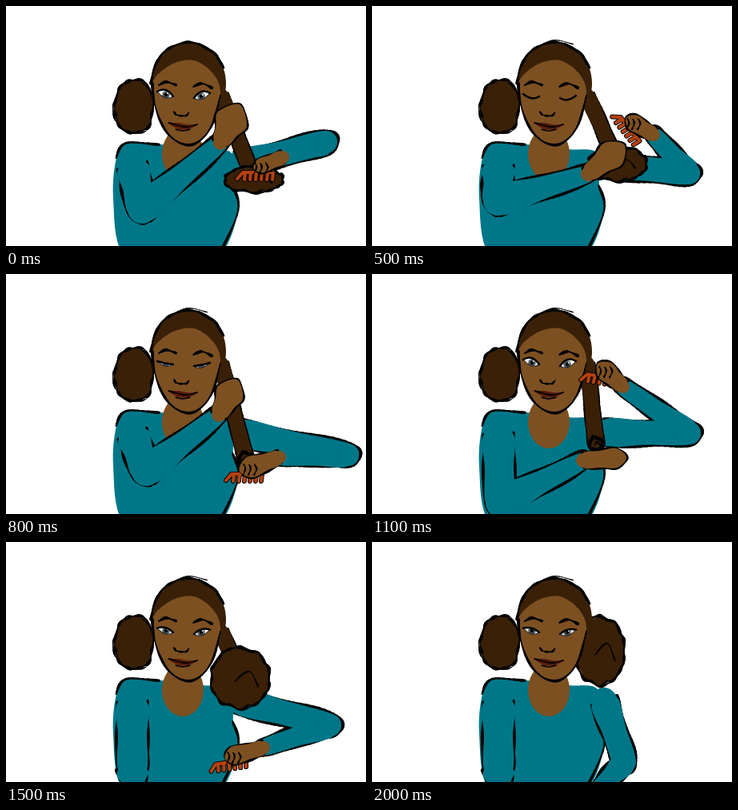
Write an HTML page with a canvas that moves like this. It is 450 px wide and 300 px high and loops after 2200 ms.

```html
<!DOCTYPE html>
<html lang="en">
<head>
<meta charset="utf-8">
<title>Combing hair</title>
<style>
html, body { margin: 0; width: 100%; height: 100%; overflow: hidden; background: #fff; }
canvas { display: block; }
</style>
</head>
<body>
<canvas id="stage" width="450" height="300"></canvas>
<script>
const ctx = document.getElementById('stage').getContext('2d');
const TEAL = '#007788', SKIN = '#7d5022', HAIR = '#3a2007', INK = '#050505', COMB = '#b5410f';
const LOOP = 2200, STEP = 100, LAST = 20;
const FAR_SHOULDER = [290, 198], NEAR_SHOULDER = [158, 200], HAIR_ROOT = [269, 112];

// far, near: elbow, wrist, knuckles, fist radius. puff: centre and radii. look: eyelid, comb tilt.
const poses = [
  { at: 0, far: [400,170, 346,189, 318,200, 9], near: [170,254, 268,171, 283,141, 20], puff: [310,217,37,16], look: [0, 0] },
  { at: 3, far: [343,282, 300,318, 280,330, 10], near: [163,250, 263,178, 283,142, 20], puff: [306,183,35,33], look: [0.7, 0] },
  { at: 5, far: [396,209, 352,161, 326,145, 10], near: [157,244, 270,210, 302,184, 17], puff: [307,197,37,22], look: [1, 0.9] },
  { at: 8, far: [427,226, 342,229, 304,242, 13], near: [175,247, 266,176, 281,147, 17], puff: [300,232,9,9], look: [0.65, 0] },
  { at: 11, far: [397,199, 314,141, 291,120, 12], near: [160,286, 264,233, 306,230, 12], puff: [280,212,8,8], look: [0, 0.15] },
  { at: 15, far: [405,229, 322,257, 284,267, 11], near: [158,285, 160,320, 160,340, 12], puff: [293,170,37,38], look: [0.2, -0.15] },
  { at: 20, far: [316,275, 281,312, 270,335, 10], near: [158,285, 160,320, 160,340, 12], puff: [285,136,31,43], look: [0.25, 0] }
];

const torso = [138,190, 150,171, 192,173, 245,179, 282,184, 284,225, 290,255, 268,310, 205,340, 146,310, 134,240];
const face = [205,74, 235,68, 260,86, 268,112, 256,152, 231,174, 203,160, 187,128, 183,96];

const mix = (a, b, k) => a + (b - a) * k;
const mixAll = (a, b, k) => a.map((v, i) => mix(v, b[i], k));

function random(seed) {
  let s = seed * 7919 + 17;
  return () => (s = (s * 16807) % 2147483647) / 2147483647 * 2 - 1;
}

// Catmull-Rom samples through a flat list of coordinates.
function curve(flat, closed) {
  const n = flat.length / 2, out = [];
  const at = i => {
    const j = closed ? (i + n) % n : Math.max(0, Math.min(n - 1, i));
    return [flat[j * 2], flat[j * 2 + 1]];
  };
  for (let i = 0; i < (closed ? n : n - 1); i++) {
    const [a, b, c, d] = [at(i - 1), at(i), at(i + 1), at(i + 2)];
    for (let s = 0; s < 8; s++) {
      const u = s / 8;
      out.push([0, 1].map(k => b[k] + 0.5 * u * (c[k] - a[k] +
        u * (2 * a[k] - 5 * b[k] + 4 * c[k] - d[k] + u * (3 * (b[k] - c[k]) + d[k] - a[k])))));
    }
  }
  out.push(at(closed ? 0 : n - 1));
  return out;
}

function fill(flat, color) {
  ctx.beginPath();
  curve(flat, true).forEach(p => ctx.lineTo(p[0], p[1]));
  ctx.fillStyle = color;
  ctx.fill();
}

function dot(x, y, r, color) {
  ctx.beginPath();
  ctx.arc(x, y, r, 0, 7);
  ctx.fillStyle = color;
  ctx.fill();
}

// Rough pen line: two wobbling passes of changing weight.
function ink(flat, width, seed, wobble = 1, closed = false) {
  const rnd = random(seed);
  ctx.strokeStyle = INK;
  for (const pass of [1, 0.6]) {
    const pts = curve(flat.map(v => v + rnd() * wobble), closed);
    const phase = rnd() * 6;
    for (let i = 1; i < pts.length; i++) {
      ctx.lineWidth = width * pass * (0.9 + 0.4 * Math.sin(i * 0.6 + phase));
      ctx.beginPath();
      ctx.moveTo(...pts[i - 1]);
      ctx.lineTo(...pts[i]);
      ctx.stroke();
    }
  }
}

function oval(x, y, rx, ry, bump = 0, points = 16) {
  const flat = [];
  for (let i = 0; i < points; i++) {
    const t = i / points * 2 * Math.PI, r = 1 + (i % 2 ? bump : -bump);
    flat.push(x + rx * r * Math.cos(t), y + ry * r * Math.sin(t));
  }
  return flat;
}

// Outline of a tapered limb, open at its start.
function limb([ax, ay], [bx, by], ra, rb) {
  const len = Math.hypot(bx - ax, by - ay) || 1;
  const dx = (bx - ax) / len, dy = (by - ay) / len;
  const side = (u, s) => {
    const r = mix(ra, rb, u) * s;
    return [mix(ax, bx, u) - dy * r, mix(ay, by, u) + dx * r];
  };
  return [...side(0, 1), ...side(0.5, 1), ...side(1, 1), bx + dx * rb, by + dy * rb,
    ...side(1, -1), ...side(0.5, -1), ...side(0, -1)];
}

// A chain of joints with radii: all outlines first, then one flat fill.
function chain(joints, radii, color, width, seed) {
  const parts = joints.slice(1).map((b, i) => limb(joints[i], b, radii[i], radii[i + 1]));
  parts.forEach((part, i) => ink(part, width, seed + i));
  parts.forEach((part, i) => {
    fill(part, color);
    dot(...joints[i], radii[i], color);
  });
}

function eye(x, y, side, lid) {
  const out = [x + side * 11, y - 3 + 3 * lid], inner = [x - side * 9, y + 3];
  const top = y - 10 + 19 * lid;
  ctx.save();
  ctx.beginPath();
  ctx.moveTo(...out);
  ctx.quadraticCurveTo(x, top, ...inner);
  ctx.quadraticCurveTo(x, y + 10, ...out);
  ctx.fillStyle = '#f4f4f4';
  ctx.fill();
  ctx.clip();
  dot(x, y + 1, 4.8, '#59656a');
  dot(x, y + 1, 2.4, '#0b0b0b');
  dot(x + 2, y - 1, 1, '#fff');
  ctx.restore();
  ctx.strokeStyle = INK;
  for (const [depth, weight] of [[top, 2.5], [y + 10, 1]]) {
    ctx.lineWidth = weight;
    ctx.beginPath();
    ctx.moveTo(...out);
    ctx.quadraticCurveTo(x, depth, ...inner);
    ctx.stroke();
  }
}

function head(lid, loose) {
  const bun = oval(160, 126, 25, 34), skull = oval(228, 97, 47, 52);
  fill(bun, HAIR);
  ink(bun, 2.8, 5, 1.8, true);
  fill(skull, HAIR);
  ink(skull.slice(16), 2.8, 8, 1.2);
  fill(face, SKIN);
  ink(face.slice(6), 2.4, 9);
  if (loose) ink([204,52, 228,43, 251,48], 1.2, 10, 0.4);
  eye(200, 110, -1, lid);
  eye(244, 112, 1, lid);
  ink([191,99, 200,95, 212,99], 3, 11, 0.3);
  ink([234,101, 245,97, 257,102], 3, 12, 0.3);
  ink([210,132, 213,136, 219,137, 225,137, 229,133], 2, 13, 0.3);
  fill([204,147, 214,146, 226,148, 238,149, 228,154, 216,154], '#571b0b');
  ink([203,146, 214,149, 226,151, 239,148], 1.5, 14, 0.3);
  ink([212,154, 221,156, 230,154], 1.2, 15, 0.2);
}

function hair([x, y, rx, ry]) {
  chain([HAIR_ROOT, [x, y]], [9, 9], HAIR, 4, 6);
  const puff = oval(x, y, rx, ry, 0.03, 20);
  fill(puff, HAIR);
  ink(puff, 2.8, 7, 1.6, true);
  ink([x - rx * 0.2, y + ry * 0.1, x + rx * 0.3, y - ry * 0.2, x + rx * 0.6, y + ry * 0.3], 1.5, 24);
}

// Drawn around the knuckles with teeth hanging down.
function comb(x, y, tilt) {
  ctx.save();
  ctx.translate(x - 4, y + 8);
  ctx.rotate(tilt);
  for (const [edge, color] of [[2, INK], [0, COMB]]) {
    ctx.strokeStyle = color;
    ctx.lineWidth = 4 + edge;
    ctx.beginPath();
    ctx.moveTo(-25, 8);
    ctx.lineTo(-18, 0);
    ctx.lineTo(20, 0);
    for (let i = 0; i < 6; i++) {
      ctx.moveTo(i * 7 - 15, 0);
      ctx.lineTo(i * 7 - 16, 9);
    }
    ctx.stroke();
  }
  ctx.restore();
}

function farHand([, , wx, wy, x, y, r], tilt) {
  comb(x, y, tilt);
  chain([[wx, wy], [x, y]], [8, r], SKIN, 3.6, 20);
  for (let i = -1; i < 2; i++) ink([x + i * 7, y - 4, x + i * 7 + 2, y + 2, x + i * 7 - 1, y + 9], 1.8, 32 + i, 0.5);
}

function arm(shoulder, [ex, ey, wx, wy], radii, seed) {
  chain([shoulder, [ex, ey], [wx, wy]], radii, TEAL, 5, seed);
}

function poseAt(step) {
  const i = Math.max(0, poses.findLastIndex(p => p.at <= step));
  const a = poses[i], b = poses[i + 1] || a;
  const u = a === b ? 0 : (step - a.at) / (b.at - a.at);
  const k = u * u * (3 - 2 * u), pose = {};
  for (const key of ['far', 'near', 'puff', 'look']) pose[key] = mixAll(a[key], b[key], k);
  return pose;
}

function draw(step) {
  const { far, near, puff, look: [lid, tilt] } = poseAt(step);
  ctx.fillStyle = '#fff';
  ctx.fillRect(0, 0, 450, 300);
  ctx.lineCap = ctx.lineJoin = 'round';

  fill(torso, TEAL);
  ink(torso.slice(0, 6), 2.8, 2);
  ink(torso.slice(10, 16), 2.8, 3);
  arm(FAR_SHOULDER, far, [16, 14, 10], 4);
  fill(oval(221, 185, 26, 33), SKIN);
  hair(puff);
  head(lid, step > 0);
  arm(NEAR_SHOULDER, near, [18, 18, 10], 16);
  farHand(far, tilt);
  chain([near.slice(2, 4), near.slice(4, 6)], [9, near[6]], SKIN, 3.6, 22);
}

let shown = -1;
function tick(now) {
  const step = Math.min(LAST, Math.floor((now % LOOP) / STEP));
  if (step !== shown) draw(shown = step);
  requestAnimationFrame(tick);
}
draw(0);
requestAnimationFrame(tick);
</script>
</body>
</html>
```
